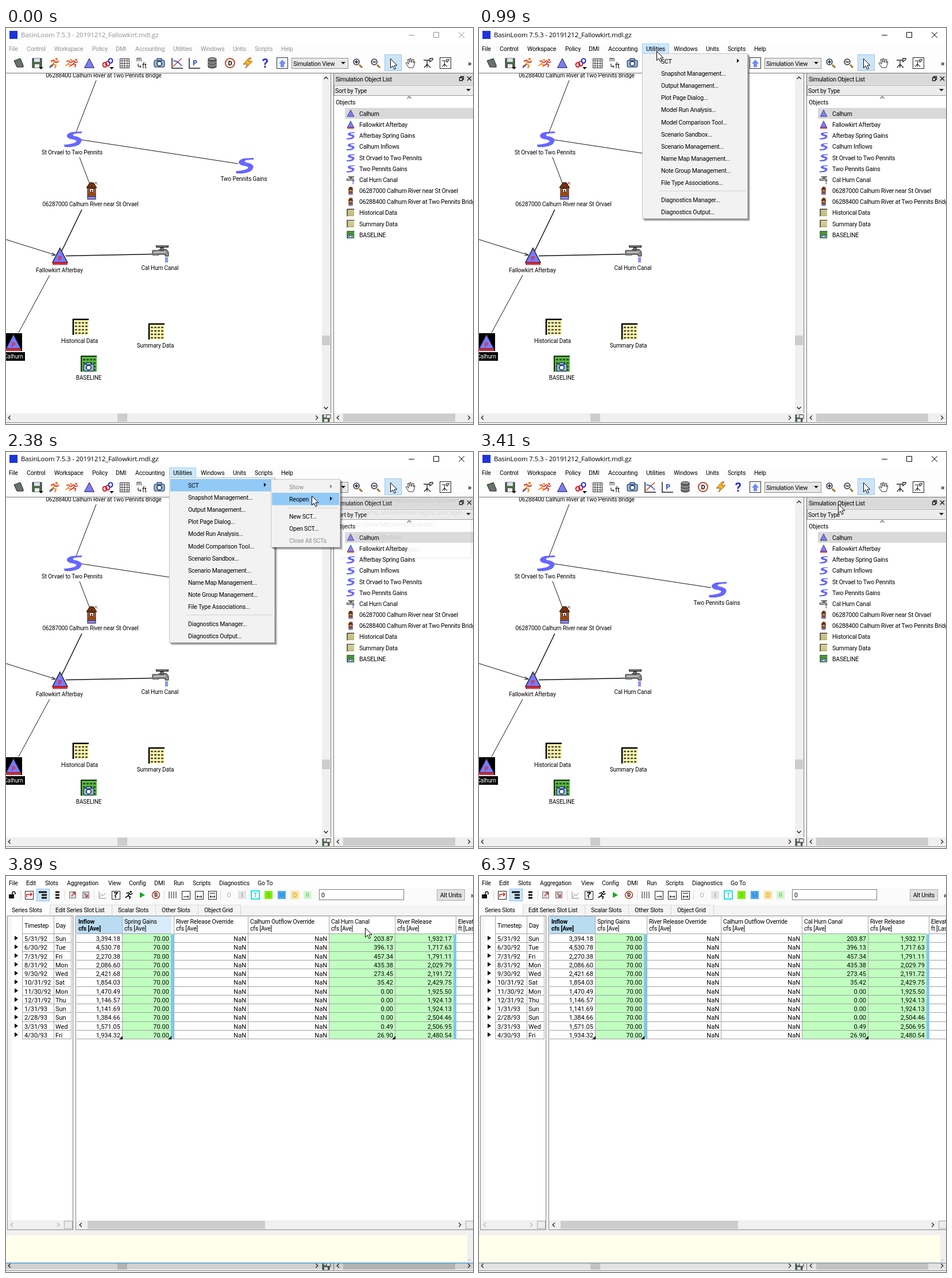
These frames come from a looping animation (813 by 689 pixels, 6450 ms). An HTML page:

```html
<!DOCTYPE html>
<html lang="en">
<head>
<meta charset="utf-8">
<title>Basin model</title>
<style>
html, body { margin: 0; width: 100%; height: 100%; overflow: hidden; background: #f0f0f0; }
svg { display: block; width: 813px; height: 689px; }
text { font: 10.5px Roboto, "Liberation Sans", sans-serif; letter-spacing: -.2px; fill: currentColor; white-space: pre; }
.title { font: 11.5px "Open Sans", sans-serif; letter-spacing: -.15px; }
.label text { font-size: 10px; letter-spacing: -.1px; text-anchor: middle; }
.cells text { font-size: 11px; letter-spacing: 0; }
.r { text-anchor: end; }
.m { text-anchor: middle; }
.b { font-weight: 700; }
.dim { color: #8c8c8c; }

.a { animation: 6.45s step-end infinite; }
.chrome { animation-name: chrome; }
.util { animation-name: util; }
.menu1 { animation-name: menu1; }
.hot1 { animation-name: hot1; }
.menu2 { animation-name: menu2; }
.hot2 { animation-name: hot2; }
.menu3 { animation-name: menu3; }
.hot3 { animation-name: hot3; }
.sheet { animation-name: sheet; transform-origin: 467px 267px; }
.wide { animation-name: wide; }
.narrow { animation-name: narrow; }
.spring { animation-name: spring; }
.canal { animation-name: canal; }
.edge { animation-name: edge; }
.shade { animation-name: shade; }
.cursor { animation-name: cursor; }

@keyframes chrome { 0% { color: #929292 } 11.78% { color: #000 } 54.10%, to { color: #929292 } }
@keyframes util { 0% { opacity: 0 } 10.54% { opacity: 1 } 52.86%, to { opacity: 0 } }
@keyframes menu1 { 0% { opacity: 0 } 12.97% { opacity: .35 } 14.15% { opacity: .75 } 15.34% { opacity: 1 } 52.86%, to { opacity: 0 } }
@keyframes hot1 { 0% { opacity: 0 } 17.72%, to { opacity: 1 } }
@keyframes menu2 { 0% { opacity: 0 } 24.85% { opacity: .2 } 26.03% { opacity: .6 } 27.20% { opacity: 1 } 52.86%, to { opacity: 0 } }
@keyframes hot2 { 0% { opacity: 0 } 29.58%, to { opacity: 1 } }
@keyframes menu3 { 0% { opacity: 0 } 36.89% { opacity: .08 } 38.13% { opacity: .6 } 39.37% { opacity: 1 } 52.86%, to { opacity: 0 } }
@keyframes hot3 { 0% { opacity: 0 } 40.62%, to { opacity: 1 } }
@keyframes sheet {
  0% { opacity: 0; transform: scale(.95) }
  55.34% { opacity: .25; transform: scale(.96) }
  56.74% { opacity: .65; transform: scale(.985) }
  57.98% { opacity: .9; transform: scale(.996) }
  59.22%, to { opacity: 1; transform: none }
}
@keyframes wide { 0% { opacity: 1 } 60.31%, to { opacity: 0 } }
@keyframes narrow { 0% { opacity: 0 } 60.31%, to { opacity: 1 } }
@keyframes spring { 0% { opacity: 1 } 82.17%, to { opacity: 0 } }
@keyframes canal { 0% { opacity: 0 } 82.17% { opacity: 1 } 84.51%, to { opacity: 0 } }
@keyframes edge { 0% { stroke: #4c9fd8 } 98.75%, to { stroke: #8d9ba5 } }
@keyframes shade { 0% { opacity: .13 } 98.75%, to { opacity: .05 } }
@keyframes cursor {
  0% { opacity: 0; transform: translate(695px, 658px) }
  1.08% { opacity: 1; transform: translate(695px, 658px); animation-timing-function: steps(4) }
  5.81% { opacity: 1; transform: translate(420px, 160px); animation-timing-function: steps(4) }
  10.54% { opacity: 1; transform: translate(309px, 40px) }
  16.54% { transform: translate(313px, 44px) }
  17.72% { transform: translate(322px, 51px) }
  18.91% { transform: translate(330px, 55px) }
  22.48% { transform: translate(344px, 56px); animation-timing-function: steps(5) }
  28.38% { transform: translate(480px, 59px); animation-timing-function: steps(3) }
  31.93% { transform: translate(532px, 76px) }
  38.13% { transform: translate(562px, 81px) }
  39.37% { transform: translate(602px, 87px) }
  40.62% { transform: translate(622px, 89px) }
  43.25% { transform: translate(624px, 89px) }
  44.34% { transform: translate(625px, 90px) }
  82.17% { transform: translate(612px, 90px) }
  83.34% { transform: translate(607px, 72px) }
  84.51% { transform: translate(612px, 52px) }
  85.68% { transform: translate(640px, 120px) }
  86.86% { transform: translate(664px, 280px) }
  88.04% { transform: translate(680px, 460px) }
  89.20% { opacity: 1; transform: translate(686px, 652px) }
  90.38%, to { opacity: 0; transform: translate(686px, 672px) }
}
</style>
</head>
<body>
<svg id="stage" viewBox="0 0 813 689"></svg>
<script>
const rect = (x, y, w, h, fill, more = '') => `<rect x="${x}" y="${y}" width="${w}" height="${h}" fill="${fill}" ${more}/>`;
const box = (x, y, w, h, fill, line) => rect(x + .5, y + .5, w - 1, h - 1, fill, `stroke="${line}"`);
const path = (d, fill = 'none', line = 'none', w = 1) => `<path d="${d}" fill="${fill}" stroke="${line}" stroke-width="${w}"/>`;
const line = (d, c = '#000', w = 1) => path(d, 'none', c, w);
const dot = (x, y, r, fill, c = 'none', w = 1) => `<circle cx="${x}" cy="${y}" r="${r}" fill="${fill}" stroke="${c}" stroke-width="${w}"/>`;
const text = (x, y, s, cls = '', more = '') => `<text x="${x}" y="${y}" class="${cls}" ${more}>${s}</text>`;
const group = (cls, s) => `<g class="${cls}">${s}</g>`;
const at = (x, y, s, k = 1) => `<g transform="translate(${x} ${y}) scale(${k})">${s}</g>`;
const each = (list, f) => list.map(f).join('');

const chevron = (x, y, turn, c = '#333') =>
  `<g transform="translate(${x} ${y}) rotate(${turn})">${line('M-3.5 1.8L0 -1.8L3.5 1.8', c, 1.5)}</g>`;
const hbar = (x, w, y, left, right, thumb, size, c) =>
  rect(x, y, w, 16, '#f0f0f0') + rect(thumb, y + 1, size, 14, '#cdcdcd') + chevron(left, y + 8, -90, c) + chevron(right, y + 8, 90, c);
const caret = (x, y) => path(`M${x - 4} ${y - 2}h8l-4 4z`, '#111');
const more = (x, y) => text(x, y, '»', 'b', 'style="font-size:13px"');

/* Object icons, drawn around their centre */
const river = path('M15 -13L-2 -12Q-11 -10 -11 -5Q-10 0 0 1Q9 3 4 6Q-2 9 -16 10L-15 14Q2 15 10 10Q16 5 14 0Q10 -4 2 -5Q-3 -7 2 -9Q8 -10 15 -10Z', '#6666ff');
const tri = (p, base) => path('M0 -14L13 11H-13Z', '#7b7bfa', '#223', 1.5) +
  (base ? rect(-13, 11, 26, 4, '#e0222c') : '') + (p ? text(0, 8, 'P', 'm b', 'style="fill:#e0222c"') : '');
const house = rect(-7, -7, 14, 17, '#b8541c', 'stroke="#3a1605"') + path('M-9 -5L-3 -14H3L9 -5Z', '#743010', '#2a1005') +
  box(-4, -4, 8, 7, '#fff', '#222') + dot(0, 0, 1.5, '#222') + line('M-6 6H6M5 -11L9 -15M6 -15L10 -11', '#421') +
  rect(-7, 10, 14, 5, '#8a8aff', 'stroke="#222"');
const faucet = path('M-15 -4H-3V-6H8Q13 -4 13 2V6H7V3H-4V4H-15Z', '#8c8c8c', '#222') + rect(-1, -9, 5, 5, '#777', 'stroke="#222"') +
  line('M-9 -11H13', '#222', 4) + line('M-8 -11.5H12', '#aaa', 1.5) + line('M-13 -1H8', '#ddd', 1.5) + rect(7, 8, 5, 9, '#8a93f5');
const dots = c => each([-7, -1, 5, 11], y => line(`M-10 ${y}H13`, c, 2.5).replace('/>', ' stroke-dasharray="4 2"/>'));
const table = rect(-14, -14, 28, 28, '#fbf6b8') + dots('#4c481c') + line('M-13 14V-13H14', '#000', 2.5);
const camera = rect(-9, -5, 18, 12, '#8fb4e8', 'rx="2" stroke="#123"') + rect(-4, -8, 8, 4, '#8fb4e8', 'stroke="#123"') + dot(0, 1, 4, '#fff', '#123', 1.5);
const baseline = rect(-14, -14, 28, 28, '#5fb544') + dots('#174d12') + line('M-13 14V-13H14', '#0c300a', 2) + at(0, 6, camera);

/* Toolbar icons */
const runner = (c, d) => dot(4, -7, 2.2, d) + line('M-6 -3L-1 -5L3 -1L8 -3', c, 2) + line('M1 -4L-2 2L3 4L1 9M-2 2L-8 6', d, 2.2);
const chart = c => line('M-9 -9V9H10', '#222', 1.5) + line('M-7 6L-1 0L8 -8', c, 1.5);
const stop = dot(0, 0, 7.5, '#fff', '#b8452c', 2) + text(0, 4, 'D', 'm b') + line('M-5 -5L5 5', '#b8452c', 1.2);
const lens = s => line('M3 3L8 8', '#9a7430', 3) + dot(-2, -2, 5, '#e2efff', '#334', 1.5) + line(s, '#111', 1.4);
const rig = line('M-8 -5H3M3 -8V-2L8 -6V-8ZM-2 -4V2L-7 8M-2 2L4 8M-2 2V8', '#222', 1.3);
const pointer = path('M.5 .5V16.5L4.2 13L6.8 18.8L9.4 17.7L6.8 12H11.8Z', '#fff', '#000');
const floppy = rect(-8, -8, 16, 16, '#4d6b4c', 'stroke="#222"') + rect(-5, -8, 10, 6, '#dde') + rect(-4, 2, 8, 6, '#eee');
const grid = box(-8, -8, 17, 17, '#fff', '#333') + line('M-4 -8V8M.5 -8V8M5 -8V8M-8 -4H8M-8 .5H8M-8 5H8', '#444');
const tools = [
  [22, path('M-8 -4L3 -8L8 4L8 7L-3 7Z', '#687368', '#222')],
  [54, floppy + caret(7, 9)],
  [84, runner('#e8332a', '#ee8b1d') + line('M-8 8L-2 3', '#2244cc', 2)],
  [114, at(-4, 0, runner('#e8332a', '#ee8b1d'), .8) + at(5, 0, runner('#e8332a', '#d83324'), .8)],
  [145, at(0, 1, tri(), .65)],
  [176, line('M-4 -1a3.5 4 0 1 0 .1 0M1 -3a3.5 4 0 1 0 .1 0', '#d81c24', 2) + line('M6 -8a3.5 4 0 1 0 .1 0', '#2233cc', 2) + caret(8, 9)],
  [206, grid],
  [237, text(-10, -3, 'm') + text(0, 9, 'ft', '', 'style="font-size:12px"') + line('M-7 1V6H-2M-4 4L-2 6L-4 8')],
  [267, camera],
  [298, chart('#d33') + line('M-7 -4Q1 -4 8 5', '#24c', 1.5)],
  [328, line('M-9 -9V9H10', '#222', 1.5) + text(1, 4, 'P', 'm b', 'style="fill:#24c;font-size:12px"')],
  [359, path('M-7 -7V7Q0 11 7 7V-7Z', '#666', '#333') + `<ellipse cy="-7" rx="7" ry="2.5" fill="#999" stroke="#333"/>` + line('M-7 -2Q0 2 7 -2M-7 3Q0 7 7 3', '#bbb')],
  [390, dot(0, 0, 8, '#fff', '#b8452c', 2) + text(0, 4, 'D', 'm b')],
  [421, path('M2 -9L-8 2H-1L-4 9L8 -3H1L6 -9Z', '#f7b32b', '#a35b10')],
  [451, text(0, 8, '?', 'm b', 'style="fill:#2b2bdc;font-size:22px"')],
  [481, box(-10, -10, 20, 20, '#f4f6ff', '#333') + path('M0 -6L6 1H3V7H-3V1H-6Z', '#6f8df5')],
  [612, lens('M-5 -2H1M-2 -5V1')],
  [643, lens('M-5 -2H1')],
  [674, rect(-14.5, -14.5, 29, 28, '#cce4f7', 'stroke="#9cc8ea"') + at(-5, -8, pointer)],
  [704, path('M-3 8L-8 0L-6 -1L-3 2L-5 -6L-3 -7L-1 -1V-8H1L2 -1L4 -7L6 -6L5 0L7 -3L8 -2L5 8Z', '#fff', '#333')],
  [735, rig],
  [765, box(-10, -10, 20, 20, '#fff', '#222') + at(0, 0, rig, .8)],
];

const menuBar = (y, items) => each(items, ([x, s]) => text(x, y, s));

/* Main window */
const nodes = [
  [117, 193, river, 115, 220, 'St Orvael to Two Pennits'],
  [416, 239, river, 414, 266, 'Two Pennits Gains'],
  [149, 283, house, 147, 310, '06287000 Calhurn River near St Orvael'],
  [94, 397, tri(1, 1), 93, 425, 'Fallowkirt Afterbay'],
  [270, 391, faucet, 268, 421, 'Cal Hurn Canal'],
  [130, 520, table, 128, 548, 'Historical Data'],
  [262, 528, table, 260, 556, 'Summary Data'],
  [144, 584, baseline, 144, 612, 'BASELINE'],
];
const map = rect(0, 79, 550, 591, '#fff') +
  line('M157 91L121 184M131 194.5L404 236M128 225L146 272M0 368L86 395M76 430L22 530M86 395l-6 -4M86 395l-7 1', '#111') +
  line('M132 316L97 388M104 396.5L254 393.5', '#111', 1.5) +
  rect(0, 531, 28, 31, '#000') + at(13, 547, tri(1, 1)) + rect(0, 564, 33, 15, '#000') +
  group('label', each(nodes, ([x, y, icon, lx, ly, s]) => at(x, y, icon) + text(lx, ly, s)) +
    text(170, 86, '06288400 Calhurn River at Two Pennits Bridge') + text(13, 575, 'Calhurn', '', 'style="fill:#fff"'));

const objects = [
  [tri(), 'Calhurn'], [tri(0, 1), 'Fallowkirt Afterbay'], [river, 'Afterbay Spring Gains'], [river, 'Calhurn Inflows'],
  [river, 'St Orvael to Two Pennits'], [river, 'Two Pennits Gains'], [faucet, 'Cal Hurn Canal'],
  [house, '06287000 Calhurn River near St Orvael'], [house, '06288400 Calhurn River at Two Pennits Bridge'],
  [table, 'Historical Data'], [table, 'Summary Data'], [baseline, 'BASELINE'],
];
const dock = rect(570, 79, 243, 607, '#fff') + rect(571, 79, 242, 19, '#dadada') + text(574, 93, 'Simulation Object List') +
  line('M789.5 86.5h5v5h-5zM791.5 86V84.5H796.5V89.5H795M803 84.5L810 91.5M810 84.5L803 91.5', '#111', 1.3) +
  box(571, 99, 244, 19, '#ececec', '#9a9a9a') + text(573, 113, 'Sort by Type') + caret(805, 108) + chevron(702, 121, 0, '#777') +
  text(574, 133, 'Objects') + rect(590, 139, 223, 19, '#d9d9d9') +
  each(objects, ([icon, s], i) => at(600, 149 + 19.15 * i, icon, .46) + text(615, 153 + 19.15 * i, s)) +
  line('M570.5 79V686', '#777');

const main = map + rect(0, 0, 813, 78, '#fdfdfd') + rect(0, 0, 813, 26, '#fff') + rect(6, 5, 14, 14, '#1d35d8') +
  group('a util', box(284, 27, 47, 20, '#cce8ff', '#99d1ff')) +
  group('a chrome', text(26, 16, 'BasinLoom 7.5.3 - 20191212_Fallowkirt.mdl.gz', 'title') +
    line('M701 12.5H711M744.5 7.5h9v9h-9zM788 7L798 17M798 7L788 17', 'currentColor') +
    menuBar(40, [[5, 'File'], [36, 'Control'], [84, 'Workspace'], [150, 'Policy'], [191, 'DMI'], [225, 'Accounting'],
      [291, 'Utilities'], [339, 'Windows'], [395, 'Units'], [433, 'Scripts'], [479, 'Help']])) +
  each(tools, ([x, icon]) => at(x, 61, icon)) +
  box(497, 52, 99, 19, '#e8e8e8', '#8f8f8f') + text(500, 66, 'Simulation View') + caret(587, 61) + more(804, 66) +
  line('M0 78.5H813', '#777') + dock +
  rect(550, 79, 15, 591, '#f0f0f0') + rect(550, 535, 14, 17, '#cdcdcd') + chevron(557, 87, 0) + chevron(557, 661, 180) +
  rect(565, 79, 5, 607, '#f0f0f0') + line('M565.5 79V686', '#888') +
  hbar(0, 550, 670, 6, 541, 194, 17) + hbar(571, 242, 670, 578, 806, 587, 195) +
  rect(550, 670, 16, 16, '#f0f0f0') + at(557, 679, floppy, .75) + rect(558, 673, 7, 6, '#fff', 'stroke="#333"') +
  line('M0 686.5H813', '#888') + rect(0, 687, 813, 2, '#f4f4f4');

/* Popup menus */
const popup = (x, y, w, h, s) => rect(x + 4, y + 4, w, h, '#000', 'opacity=".22"') + rect(x + 2, y + 2, w, h, '#000', 'opacity=".3"') +
  box(x, y, w, h, '#f2f2f2', '#c4c4c4') + s;
const hot = (cls, x, y, w) => group('a ' + cls, rect(x, y, w, 21.5, '#91c9f7'));
const arrow = (x, y, c = '#000') => path(`M${x} ${y - 3.5}v7l4 -3.5z`, c);
const utilities = ['SCT', 'Snapshot Management...', 'Output Management...', 'Plot Page Dialog...', 'Model Run Analysis...',
  'Model Comparison Tool...', 'Scenario Sandbox...', 'Scenario Management...', 'Name Map Management...', 'Note Group Management...',
  'File Type Associations...', 'Diagnostics Manager...', 'Diagnostics Output...'];
const paths = ['C:/Users/MDorne/Downloads/fallowkirt', 'C:/Temp_Models/Water Rights Shortages', 'C:/Users/MDorne/Downloads/',
  'C:/Temp_Models/', 'C:/Temp_Models/Argue/'];
const menus =
  group('a menu1', popup(284, 44, 184, 288, hot('hot1', 286, 47, 180) + arrow(449, 57) + line('M314 283.5H464', '#d0d0d0') +
    each(utilities, (s, i) => text(317, 62 + 21.1 * i + (i > 10 ? 8.5 : 0), s)))) +
  group('a menu2', popup(461, 47, 121, 119, hot('hot2', 463, 71, 117) + arrow(564, 60, '#8c8c8c') + arrow(564, 81) +
    line('M491 97.5H578', '#d0d0d0') + text(493, 65, 'Show', 'dim') + text(493, 86, 'Reopen') + text(493, 116, 'New SCT...') +
    text(493, 137, 'Open SCT...') + text(493, 158, 'Close All SCTs', 'dim'))) +
  group('a menu3', popup(580, 71, 229, 112, hot('hot3', 582, 73, 225) + each(paths, (s, i) => text(609, 88 + 21.2 * i, s))));

/* Slot table window */
const words = s => s.split(' ');
const dates = words('5/31/92 6/30/92 7/31/92 8/31/92 9/30/92 10/31/92 11/30/92 12/31/92 1/31/93 2/28/93 3/31/93 4/30/93');
const days = words('Sun Tue Fri Mon Wed Sat Mon Thu Sun Sun Wed Fri');
const same = s => dates.map(() => s);
const rowY = i => 101 + 15.27 * i;
const bottom = rowY(12);
const columns = [
  [123, 203, 'Inflow', 199, words('3,394.18 4,530.78 2,270.38 2,086.60 2,421.68 1,854.03 1,470.49 1,146.57 1,141.69 1,384.66 1,571.05 1,934.32')],
  [203, 288, 'Spring Gains', 284, same('70.00'), 1],
  [293, 422, 'River Release Override', 418, same('NaN')],
  [422, 563, 'Calhurn Outflow Override', 559, same('NaN')],
  [563, 678, 'Cal Hurn Canal', 674, words('203.87 396.13 457.34 435.38 273.45 35.42 0.00 0.00 0.00 0.00 0.49 26.90'), 1],
  [678, 779, 'River Release', 776, words('1,932.17 1,717.63 1,791.11 2,029.79 2,191.72 2,429.75 1,925.50 1,924.13 1,924.13 2,504.46 2,506.95 2,480.54'), 1],
  [784, 900, 'Elevation', 896, same('')],
];
const rules = (x, w) => each([...dates, 0], (_, i) => line(`M${x} ${Math.round(rowY(i)) - .5}h${w}`, '#a0a0a0'));
const column = ([x, end, name, right, values, green], i) => {
  const bold = i ? '' : 'b';
  return (green ? rect(x, 101, end - x, bottom - 101, '#c0ffc0') : '') +
    text(x + 3, 83, name, bold) + text(x + 3, 95, i < 6 ? 'cfs [Ave]' : 'ft [Last]', bold) +
    (i ? line(`M${x - .5} 70V${bottom}`, '#a8a8a8') : '') +
    rules(x, end - x) + group('cells', each(values, (s, k) => text(right, rowY(k) + 12, s, 'r')));
};
const corner = x => path(`M${x} ${bottom}v-6l-6 6z`, '#000');
const cells = rect(123, 70, 80, 31, '#b9dcf2') + group('a spring', rect(203, 70, 85, 31, '#d8ebf8')) +
  group('a canal', rect(563, 70, 115, 31, '#d8ebf8')) + each(columns, column) +
  rect(287, 101, 5, bottom - 101, '#7fc8f0') + rect(779, 101, 5, bottom - 101, '#7fc8f0') + corner(203) + corner(288) + corner(678);
const rowHeads = text(32, 90, 'Timestep') + text(87, 90, 'Day') + rules(28, 86) +
  line(`M28.5 70V${bottom}M83.5 70V${bottom}M113.5 70V${bottom}`, '#a8a8a8') + rect(3, 70, 7, 531, '#f6f6f6') +
  group('cells', each(dates, (s, i) => path(`M15 ${rowY(i) + 3}v8l6 -4z`, '#000') + text(32, rowY(i) + 12, s) + text(86, rowY(i) + 12, days[i])));

/* split is the left inner edge of the value pane */
const panes = (cls, split, thumb) => group('a ' + cls,
  box(2, 69, split - 7, 547, '#fff', '#828790') + rowHeads + hbar(3, split - 9, 599, 10, split - 31, 0, 0, '#bbb') +
  box(split - 21, 600, 15, 14, '#ececec', '#aaa') +
  box(split - 1, 69, 818 - split, 547, '#fff', '#828790') +
  `<clipPath id="${cls}"><rect x="${split}" y="70" width="${815 - split}" height="530"/></clipPath>` +
  `<g clip-path="url(#${cls})">${at(split - 122, 0, cells)}</g>` +
  hbar(split, 815 - split, 599, split + 8, 790, split + 20, thumb) + box(800, 600, 15, 14, '#ececec', '#aaa'));

const flags = [['O', 388, '#fafafa', '#aaa'], ['I', 411, '#e4e4e4', '#888'], ['T', 434, '#fff', '#0aa'], ['S', 457, '#80f010', '#58b010'],
  ['M', 480, '#4aaaf0', '#2a80d0'], ['D', 503, '#ffe09a', '#c89a40'], ['R', 525, '#d4f8d0', '#70b870']];
const frame = box(-7, -7, 15, 15, '#fff', '#222');
const bars = each([-5, 0, 5], y => rect(-3, y - 1.5, 7, 3, '#111'));
const slotTools = [
  [10, rect(-5, -1, 9, 7, '#111') + line('M1 -1V-4Q3 -8 6 -4V-1', '#111', 1.6)],
  [40, frame + line('M-4 4V-1H5M2 -4L5 -1L2 2', '#c22', 1.5)],
  [64, box(-11, -11, 23, 22, '#cce4f7', '#8cc4ee') + line('M-7 -5H7M-2 0H7M-2 5H7', '#111', 3)],
  [89, bars],
  [116, box(-6, -6, 12, 12, '#ddd', '#777') + line('M-2 2L4 -4M0 -4H4V0', '#b33', 1.3)],
  [139, box(-6, -6, 12, 12, '#ccc', '#777') + line('M-3 -3L3 3M3 -1V3H-1', '#b33', 1.3)],
  [168, at(0, 0, line('M-9 -9V9H10', '#444') + line('M-7 5L-2 -2L2 2L8 -5', '#555'), .65)],
  [191, frame + line('M-3 -4H3L-1 1L0 5', '#111', 1.8)],
  [214, at(0, 0, runner('#111', '#111'), .8)],
  [237, path('M-4 -5L5 0L-4 5Z', '#16a821')],
  [261, at(0, 0, stop, .85)],
  [290, each([-6, -2, 2, 6], x => line(`M${x} -6V6`, '#888', 2))],
  ...[313, 336, 359].map((x, i) => [x, frame + line(`M-4 3H5M${i ? '-2 1L-4 3L-2 5M' : ''}3 1L5 3L3 5${i > 1 ? 'M-4 -3H5' : ''}`)]),
  ...flags.map(([s, x, fill, c]) => [x, rect(-7, -7, 14, 14, fill, s == 'T' ? 'stroke="#20e0e8" stroke-width="2"' : '') + text(0, 4, s, 'm', `style="fill:${c}"`)]),
];
const tabs = [[10, 'Series Slots', 76], [86, 'Edit Series Slot List', 184], [195, 'Scalar Slots', 260], [271, 'Other Slots', 334], [345, 'Object Grid', 408]];

const sheet = group('a sheet', rect(-3, -30, 823, 703, '#f4f4f4') + rect(-3, -30, 823, 52, '#fff') + rect(-3, 22, 823, 28, '#fbfbfb') +
  menuBar(15.5, [[5, 'File'], [35, 'Edit'], [68, 'Slots'], [106, 'Aggregation'], [178, 'View'], [214, 'Config'], [258, 'DMI'],
    [292, 'Run'], [325, 'Scripts'], [371, 'Diagnostics'], [438, 'Go To']]) +
  each(slotTools, ([x, icon]) => at(x, 33, icon)) + line('M25.5 25V42M102.5 25V42M153.5 25V42M275.5 25V42M373.5 25V42', '#d8d8d8') +
  box(545, 23, 148, 19, '#fff', '#7a7a7a') + text(549, 37, '0') + box(750, 23, 49, 20, '#e1e1e1', '#adadad') + text(774.5, 37, 'Alt Units', 'm') + more(809, 38) +
  rect(0, 50, 76, 19, '#fff') + each(tabs, ([x, s, end]) => text(x, 63, s) + line(`M${end + .5} 51V68`, '#d4d4d4')) + line('M76 50.5H408', '#dcdcdc') +
  panes('wide', 515, 53) + panes('narrow', 122, 309) +
  rect(-3, 616, 823, 57, '#f0f0f0') + rect(0, 625, 803, 46, '#ffffec') +
  line('M804 670l4 -4M808 670l2 -2', '#aaa') +
  rect(-3, 674, 823, 10, '#000', 'class="a shade"') +
  `<path class="a edge" d="M-2.5 -30V673.5H820" fill="none" stroke-width="1.4"/>`);

document.getElementById('stage').innerHTML = main + menus + sheet + group('a cursor', pointer);
</script>
</body>
</html>
```
